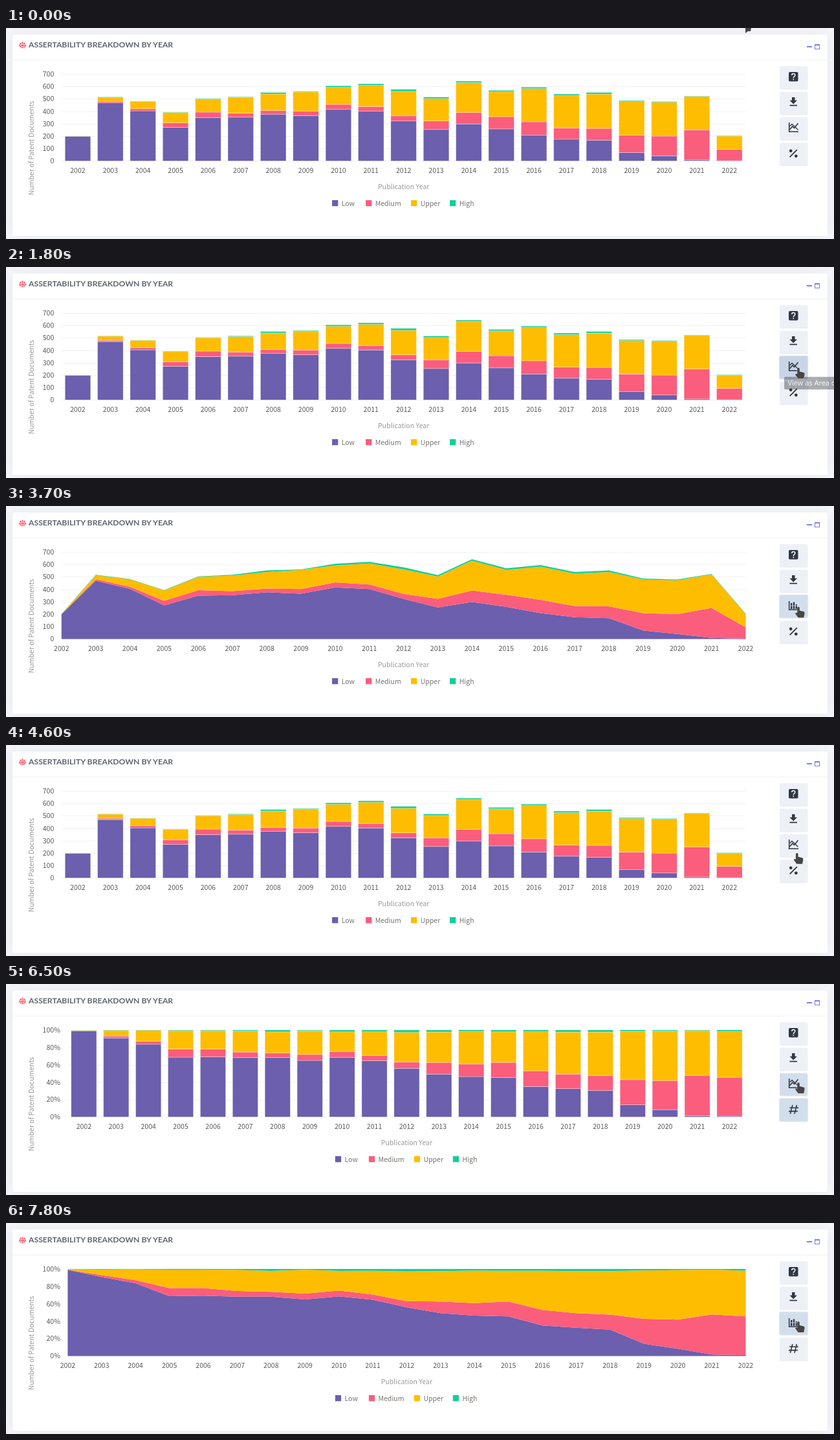
These frames come from a looping animation (1280x326 px, 8000 ms). An HTML page:

```html
<!DOCTYPE html>
<html lang="en">
<head>
<meta charset="utf-8">
<title>Assertability breakdown</title>
<style>
  html, body { margin: 0; width: 100%; height: 100%; overflow: hidden; background: #f5f6fa; }
  svg { display: block; width: 1280px; height: 326px; }
  text { font-family: "Noto Sans CJK SC", "Noto Sans CJK JP", "Noto Sans CJK", "Noto Sans", sans-serif; font-size: 10.55px; }
  .heading { font: 700 12.2px Lato, sans-serif; fill: #60656f; }
  .card { fill: #fff; filter: drop-shadow(0 0 12px rgba(154, 161, 171, .16)); }
  .label { fill: #595959; }
  .title { fill: #999; }
  .legend { fill: #77736f; }
  .icon { fill: none; stroke: #303844; stroke-width: 1.8; }
  .icon .solid { fill: #303844; stroke: none; }
  .tip text { font: 11px "Open Sans", sans-serif; fill: #fff; }
  .cursor { fill: #464646; stroke: #f4f4f4; stroke-width: .8; stroke-linejoin: round; paint-order: stroke; }
</style>
</head>
<body>
<svg viewBox="0 0 1280 326">
  <rect width="1280" height="326" fill="#f5f6fa"/>
  <rect class="card" x="10" y="10" width="1260" height="311" rx="3"/>
  <path d="M10 49.5H1270" stroke="#f0f2f6"/>
  <g fill="none" stroke="#f8626f" stroke-width="1.1">
    <path d="M25.5 21V30.5M21.5 23.3H29.5M22 30.5H29M20.5 27.5L22.5 23.5L24.5 27.5M26.5 27.5L28.5 23.5L30.5 27.5"/>
    <path d="M20.5 27.5Q22.5 30 24.5 27.5ZM26.5 27.5Q28.5 30 30.5 27.5Z" fill="#f8626f"/>
  </g>
  <text class="heading" x="35" y="30.2">ASSERTABILITY BREAKDOWN BY YEAR</text>
  <path d="M1238 29H1246" stroke="#7d80ee" stroke-width="2"/>
  <path d="M1250.5 26V32.5H1257.5V26M1250 26.2H1258" fill="none" stroke="#7d80ee" stroke-width="1.2"/>
  <path d="M1250 26H1258" stroke="#7d80ee" stroke-width="2"/>
  <g id="chart"></g>
  <g id="buttons"></g>
  <g class="icon">
    <g>
      <rect class="solid" x="1210" y="68" width="14.5" height="14.5" rx="1.8"/>
      <path d="M1214.8 72.9C1214.8 69.6 1219.8 69.6 1219.8 72.8C1219.8 74.8 1217.3 74.7 1217.3 77.2M1217.3 78.6V80.2" stroke="#fff" stroke-width="1.5"/>
    </g>
    <path class="solid" d="M1215 107H1219.5V111.8H1223L1217.2 117.4L1211.5 111.8H1215ZM1211.5 118.8H1223V120.5H1211.5Z"/>
    <g id="lineIcon">
      <path d="M1210.7 146V160.3H1225" stroke-width="1.6"/>
      <path d="M1211.5 157L1215.8 152L1218.5 154.5L1224.5 147.3" stroke-width="1.6"/>
      <path d="M1211.5 152L1215 148.5L1219 152L1224.5 157.5" stroke-width="1.3"/>
    </g>
    <g id="barIcon">
      <path d="M1210.7 147V160.3H1225" stroke-width="1.6"/>
      <path d="M1214.2 150V159M1218 148.5V159M1221.8 152V159" stroke-width="2.4"/>
      <path d="M1213 154H1223" stroke="#d3deec" stroke-width=".8"/>
    </g>
    <g id="percentIcon">
      <path d="M1211.7 199.3L1222.8 188.2"/>
      <circle class="solid" cx="1213.2" cy="189.8" r="2.4"/>
      <circle class="solid" cx="1221.3" cy="197.8" r="2.4"/>
    </g>
    <path id="hashIcon" d="M1215.9 187L1212.4 200.8M1222.4 187L1218.9 200.8M1211.2 191.3H1225M1210 196.6H1223.8" stroke-width="1.6"/>
  </g>
  <g id="tip" class="tip">
    <rect x="1203" width="90" height="19.5" rx="2" fill="#2d333d"/>
    <text x="1208.5" y="13.6">View as Area chart</text>
  </g>
  <path id="cursor" class="cursor"/>
</svg>
<script>
const LOOP = 8000, STEP = 100;
const BASE = 205.4, TOP = 71, RIGHT = 1143.5;
const SERIES = [["Low", "#6b5fae", 0], ["Medium", "#fb5d7d", 52], ["Upper", "#ffbd00", 122], ["High", "#12cf98", 182]];
// Running totals per year: low, medium, upper, high
const TOTALS = [
  [199, 199, 200.5, 201], [468, 480, 513, 516], [403, 420, 480, 482], [270, 307, 390, 393],
  [349, 393, 500, 504], [352, 385, 510, 516], [376, 406, 539, 551], [364, 402, 555, 560],
  [415, 455, 592, 605], [402, 438, 608, 621], [322, 363, 560, 576], [253, 322, 502, 514],
  [298, 390, 630, 642], [258, 356, 556, 568], [208, 315, 582, 594], [175, 265, 525, 538],
  [167, 262, 538, 551], [68, 208, 478, 486], [40, 200, 472, 478], [8, 250, 519, 523], [2, 93, 200, 204]
];
const ARROW = "M0 0V17L4 14H8L9 9Z";
const HAND = "M-1.8 1.5C-1.8 -.7 1.8 -.7 1.8 1.5V5.6L8 7Q10 7.6 9.6 10.2L8.3 16.6H-.4L-4.8 10.4Q-4.4 7.8 -1.8 9.6Z";

// Each track lists [start time, value]; values hold until the next start.
const MODES = [[0, "bars"], [1900, ""], [2000, "area"], [3900, "bars"], [5600, "bars%"], [7400, ""], [7500, "area%"]];
const ICON3 = [[0, "line"], [1900, "bar"], [3800, "line"], [7400, "bar"]];
const BUTTON3 = [[0, "idle"], [600, "hover"], [1700, "press"], [2100, "focus"], [4000, "idle"], [6400, "hover"], [7300, "press"], [7600, "focus"]];
const BUTTON4 = [[0, "idle"], [4800, "hover"], [5400, "press"], [5700, "focus"], [7300, "idle"]];
const TIP = [[0, 0], [1300, .5], [1400, .9], [1800, .4], [1900, .2], [2000, 0], [7100, .5], [7200, .9], [7400, .3], [7500, .12], [7600, 0]];
const PATH = [[0, 1143, -9], [500, 1222, 136], [600, 1226, 165], [700, 1225, 156], [4500, 1225, 156],
  [4900, 1216, 201], [6100, 1216, 201], [6500, 1225, 152.5], [8000, 1225, 152.5]];
const LOOKS = { idle: ["#edf1f7", 0], hover: ["#d3deec", 0], press: ["#c9d5e6", 1], focus: ["#d3deec", .75] };

const $ = id => document.getElementById(id);
const at = (track, t) => track.filter(k => k[0] <= t).pop()[1];
const label = (cls, x, y, s, anchor = "middle") => `<text class="${cls}" x="${x}" y="${y}" text-anchor="${anchor}">${s}</text>`;

function drawChart(mode) {
  if (!mode) return "";
  const pct = mode.endsWith("%"), area = mode.startsWith("area");
  const left = pct ? 95.4 : 85.8, width = RIGHT - left, max = pct ? 100 : 700;
  const y = v => BASE - v / max * (BASE - TOP);
  const value = (i, s) => s < 0 ? 0 : TOTALS[i][s] * (pct ? 100 / TOTALS[i][3] : 1);
  const pitch = width / (area ? 20 : 21);
  const x = i => left + pitch * (area ? i : i + .5);
  let out = "";
  for (let v = 0; v <= max; v += pct ? 20 : 100) {
    out += `<path d="M${left} ${Math.round(y(v)) + .5}H${RIGHT}" stroke="#f1f1f4"/>`;
    out += label("label", left - 11.5, y(v) + 3.9, v + (pct ? "%" : ""), "end");
  }
  SERIES.forEach(([, color], s) => {
    if (area) {
      const edge = k => TOTALS.map((_, i) => `${x(i)} ${y(value(i, k))}`);
      out += `<path d="M${edge(s).join("L")}L${edge(s - 1).reverse().join("L")}Z" fill="${color}"/>`;
      return;
    }
    const w = pitch * .785;
    TOTALS.forEach((_, i) => {
      const top = y(value(i, s)), h = y(value(i, s - 1)) - top;
      if (h > .05) out += `<rect x="${x(i) - w / 2}" y="${top}" width="${w}" height="${h}" fill="${color}" stroke="#fff" stroke-opacity=".45" stroke-width=".7"/>`;
    });
  });
  TOTALS.forEach((_, i) => out += label("label", x(i), 223.5, 2002 + i));
  const mid = left + width / 2;
  out += label("title", mid, 249.3, "Publication Year");
  out += `<g transform="translate(43 185.5) rotate(-90)">${label("title", 0, 0, "Number of Patent Documents")}</g>`;
  for (const [name, color, dx] of SERIES) {
    const lx = mid - 110.6 + dx;
    out += `<rect x="${lx}" y="266" width="9.3" height="9.3" fill="${color}"/>` + label("legend", lx + 14.6, 274.8, name, "start");
  }
  return out;
}

function drawButtons(states) {
  return states.map((state, i) => {
    const y = 59 + i * 39.4, [fill, ring] = LOOKS[state];
    return `<rect x="1196" y="${y + 1}" width="43.5" height="35" rx="2" fill="#9aa5b5" opacity=".2"/>` +
      `<rect x="1194.8" y="${y - 1}" width="45.4" height="36.6" rx="3" fill="#dde5ef" opacity="${ring}"/>` +
      `<rect x="1196" y="${y}" width="43" height="34.6" rx="2" fill="${fill}"/>`;
  }).join("");
}

function cursorAt(t) {
  const n = PATH.findIndex(k => k[0] > t), a = PATH[n - 1], b = PATH[n];
  const p = (t - a[0]) / (b[0] - a[0]);
  return [a[1] + (b[1] - a[1]) * p, a[2] + (b[2] - a[2]) * p];
}

const show = (id, on) => $(id).setAttribute("display", on ? "inline" : "none");
let shownMode = null;

function render(time) {
  const t = Math.floor(time % LOOP / STEP) * STEP;
  const mode = at(MODES, t);
  if (mode !== shownMode) $("chart").innerHTML = drawChart(shownMode = mode);
  $("buttons").innerHTML = drawButtons(["idle", "idle", at(BUTTON3, t), at(BUTTON4, t)]);
  const bar = at(ICON3, t) === "bar";
  show("lineIcon", !bar);
  show("barIcon", bar);
  show("percentIcon", t < 5500);
  show("hashIcon", t >= 5500);
  $("tip").setAttribute("opacity", at(TIP, t));
  $("tip").setAttribute("transform", `translate(0 ${t < 5000 ? 169.8 : 165.8})`);
  const [cx, cy] = cursorAt(t);
  $("cursor").setAttribute("d", cx > 1196 && cy > 59 ? HAND : ARROW);
  $("cursor").setAttribute("transform", `translate(${cx} ${cy})`);
}

const start = performance.now();
function loop() {
  render(performance.now() - start);
  requestAnimationFrame(loop);
}
loop();
</script>
</body>
</html>
```
